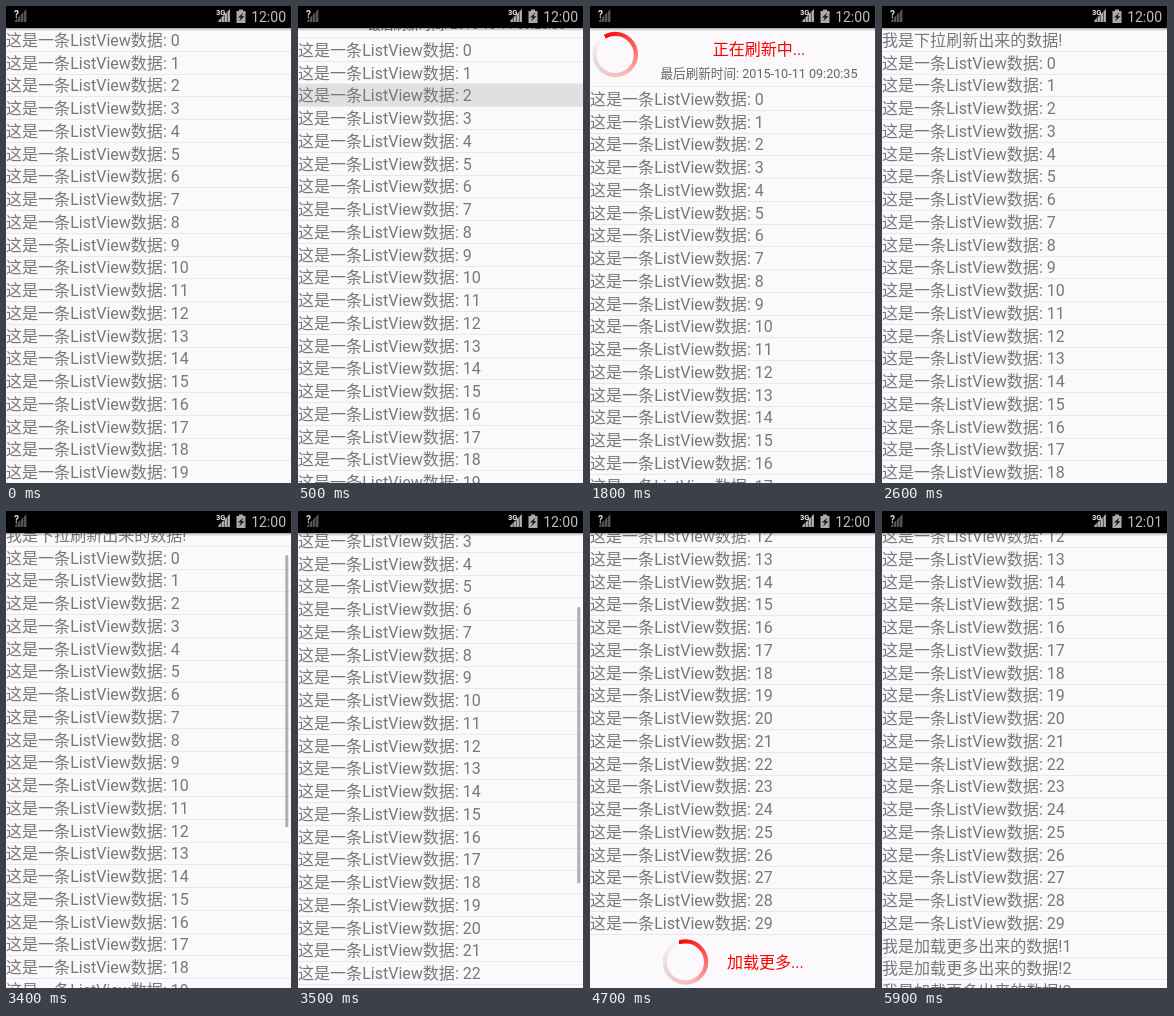
Animation of 286x477 px, one loop 6800 ms. Source, as an HTML page with a canvas:

```html
<!DOCTYPE html>
<html lang="zh-CN">
<head>
<meta charset="utf-8">
<style>
html, body { margin: 0; height: 100%; overflow: hidden; background: #fbf9fc; }
canvas { display: block; }
</style>
</head>
<body>
<canvas id="stage" width="286" height="477"></canvas>
<script>
const ctx = document.getElementById('stage').getContext('2d');
const LOOP = 6800, STEP = 100;
const W = 285, H = 477, BAR = 22, ROW = 22.75, HEADER = 59;
const PULLED = 500, REFRESH = 800, REFRESHED = 2600;
const FLING = 3400, LOADING = 3800, LOADED = 5600;
const PULL = [{ y: 10, angle: 90 }, { y: 64, angle: 50 }, { y: 89.5, angle: -33 }];
const SCROLL = [10, 95, 185, 249.7, 304.5];

const baseRows = Array.from({ length: 30 }, (_, i) => '这是一条ListView数据: ' + i);
const newRow = '我是下拉刷新出来的数据!';
const moreRows = [1, 2, 3].map(i => '我是加载更多出来的数据!' + i);

function text(str, x, y, size, color, align = 'left', weight = 400) {
  ctx.font = `${weight} ${size}px Roboto, "Noto Sans CJK SC", "Noto Sans CJK", sans-serif`;
  ctx.fillStyle = color;
  ctx.textAlign = align;
  ctx.fillText(str, x, y);
}

function rect(x, y, w, h, color) {
  ctx.fillStyle = color;
  ctx.fillRect(x, y, w, h);
}

function shape(points, color) {
  ctx.fillStyle = color;
  ctx.beginPath();
  points.forEach(([x, y]) => ctx.lineTo(x, y));
  ctx.fill();
}

// Ring whose red head turns counter-clockwise by 12° per step
function spinner(x, y, elapsed) {
  const head = -elapsed / STEP * 12 * Math.PI / 180;
  const sweep = ctx.createConicGradient(head, x, y);
  sweep.addColorStop(0, '#ff0000');
  sweep.addColorStop(0.5, '#ff000044');
  sweep.addColorStop(1, '#00000000');
  ctx.strokeStyle = sweep;
  ctx.lineWidth = 4.2;
  ctx.beginPath();
  ctx.arc(x, y, 20.6, 0, 7);
  ctx.stroke();
}

function arrow(x, y, angle) {
  ctx.save();
  ctx.translate(x, y);
  ctx.rotate(angle * Math.PI / 180);
  for (let i = 0; i < 5; i++) {
    rect(-16 + i * 4, -4, 3, 8, `rgba(240,40,35,${0.2 + i * 0.16})`);
  }
  shape([[3, -4], [5, -4], [5, -8], [16, 0], [5, 8], [5, 4], [3, 4]], '#f5241f');
  ctx.restore();
}

function header(offset, t) {
  const top = BAR + offset - HEADER;
  const pull = PULL[(t - PULLED) / STEP];
  let title = '正在刷新中...';
  if (pull) {
    title = offset < HEADER ? '下拉刷新' : '释放刷新';
    arrow(26, top + 26, pull.angle);
  } else {
    spinner(25.3, top + 26.5, t - REFRESH);
  }
  text(title, 169, Math.round(top + 27), 16, '#ff0000', 'center');
  text('最后刷新时间: 2015-10-11 09:20:35', 169, Math.round(top + 49.5), 12.6, '#666', 'center');
}

function list(rows, offset, pressed) {
  rows.forEach((label, i) => {
    const top = BAR + offset + i * ROW;
    if (top < -ROW || top > H) return;
    if (pressed && i === 2) rect(0, top, W, ROW, '#e0dfe1');
    text(label, 0, Math.round(top + 17.8), 16.05, '#78777a');
    rect(0, Math.round(top + ROW), W, 1, '#e9e7ea');
  });
}

function scrollbar(scroll, alpha) {
  const top = 38 + 0.608 * scroll;
  const bottom = Math.min(475, 309.5 + 0.6625 * scroll);
  ctx.fillStyle = `rgba(150,150,152,${0.75 * alpha})`;
  ctx.beginPath();
  ctx.roundRect(279.3, top, 3, bottom - top, 1.5);
  ctx.fill();
}

function signal(x, color) {
  for (let i = 0; i < 4; i++) {
    const left = x + i * 3, y = 13 - i * 3;
    shape([[left, y + 1.5], [left + 2.4, y - 0.9], [left + 2.4, 16], [left, 16]], color);
  }
}

function statusBar(t) {
  const shadow = ctx.createLinearGradient(0, BAR, 0, BAR + 3);
  shadow.addColorStop(0, 'rgba(0,0,0,0.35)');
  shadow.addColorStop(1, 'rgba(0,0,0,0)');
  rect(0, BAR, W, 3, shadow);
  rect(0, 0, W, BAR, '#000');
  signal(9, '#555');
  text('?', 8, 12, 10, '#ddd', 'left', 700);
  signal(212.5, '#b4b4b4');
  text('3G', 210, 9, 7.5, '#eee', 'left', 700);
  rect(233, 3.5, 4, 2, '#aaa');
  rect(230.5, 5, 9, 12, '#aaa');
  shape([[237.5, 6.5], [232, 11.5], [235, 11.5], [233, 15.5], [238.5, 10.2], [235.5, 10.2]], '#111');
  text(t < 5900 ? '12:00' : '12:01', 280, 15.5, 14, '#bebebe', 'right');
}

function draw(t) {
  rect(0, 0, W + 1, H, '#fbf9fc');
  const refreshing = t >= PULLED && t < REFRESHED;
  const pulling = refreshing && t < REFRESH;
  let rows = baseRows, offset = 0;
  if (refreshing) offset = pulling ? PULL[(t - PULLED) / STEP].y : HEADER;
  if (t >= REFRESHED) rows = [newRow, ...rows];
  if (t >= LOADED) rows = [...rows, ...moreRows];
  if (t >= FLING) offset = -SCROLL[Math.min(4, (t - FLING) / STEP)];

  if (refreshing) {
    header(offset, t);
    rect(0, Math.round(BAR + offset) - 1, W, 1, '#e9e7ea');
  }
  list(rows, offset, pulling);
  if (t >= LOADING && t < LOADED) {
    spinner(95.5, 451, t - LOADING);
    text('加载更多...', 137, 457, 16, '#ff0000');
  }
  const fade = Math.min(1, 1 - (t - 4050) / 250);
  if (t >= FLING && fade > 0) scrollbar(-offset, fade);
  statusBar(t);
  rect(W, 0, 1, H, '#444');
}

function tick() {
  draw(Math.floor(performance.now() % LOOP / STEP) * STEP);
  requestAnimationFrame(tick);
}
tick();
</script>
</body>
</html>
```
